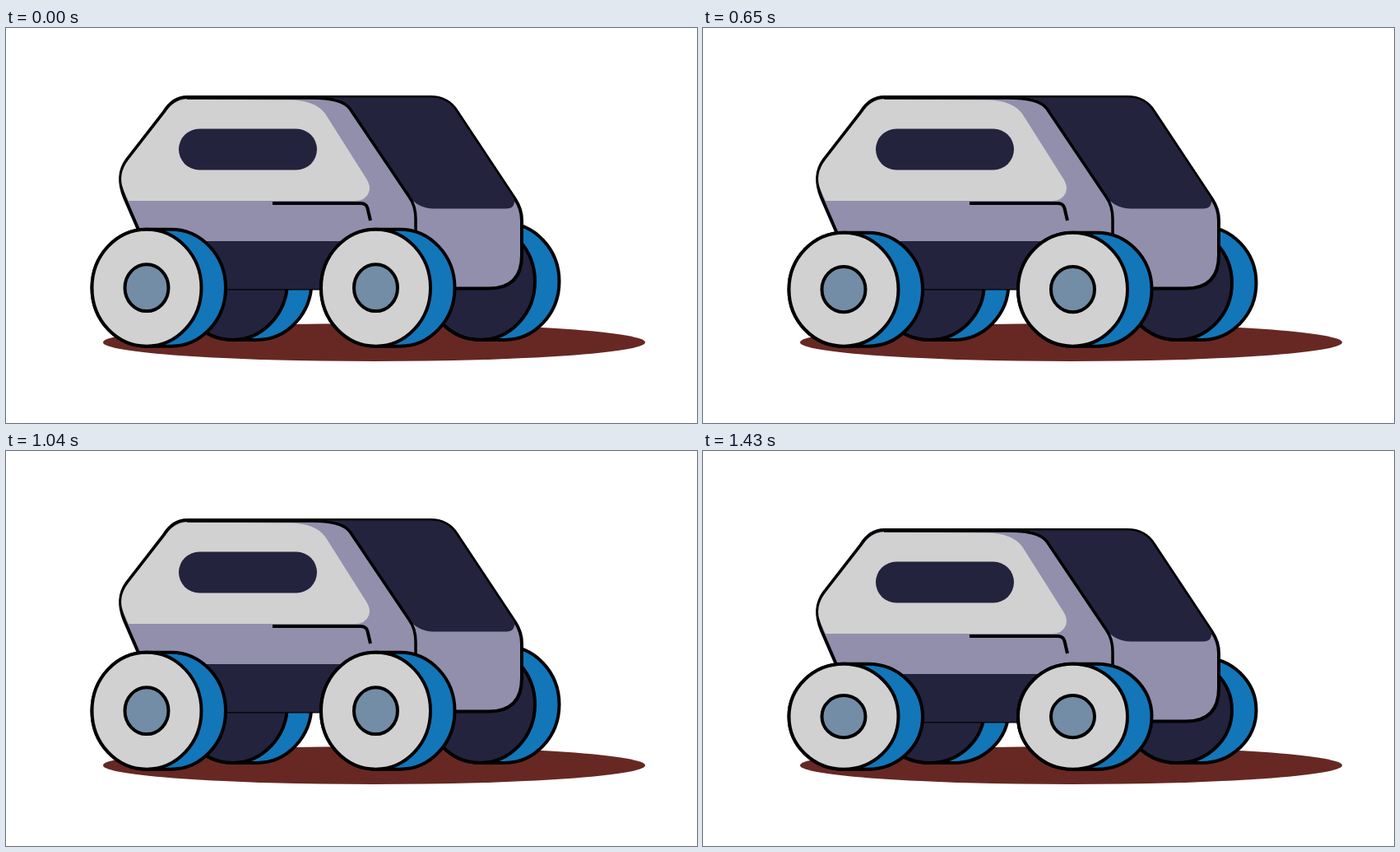
Recreate the animation shown at these times as an HTML page with a canvas. Size 840 px wide and 480 px high, loop 1560 ms.

```html
<!DOCTYPE html>
<html lang="en">
<head>
<meta charset="utf-8">
<title>Rover</title>
<style>
html, body { margin: 0; width: 100%; height: 100%; overflow: hidden; background: #fff; }
canvas { display: block; }
</style>
</head>
<body>
<canvas id="stage" width="840" height="480"></canvas>
<script>
const ctx = document.getElementById("stage").getContext("2d");
const GREY = "#d1d1d1", LILAC = "#918fac", NAVY = "#23233d", BLUE = "#1376b9",
      STEEL = "#738da6", SOIL = "#672823";

// One pose per step: how far the body sinks and how much the wheels are squashed
const STEP = 130;
const sink   = [0, 0, 0, 0, 0, 0, 4, 12, 0, 4, 8, 12];
const squash = [0, 4, 0, 4, 0, 4, 4, 14, 0, 4, 8, 14];

const hull = new Path2D("M220 84H516Q537 84 548 101L619 208Q627 220 627 234V276Q627 316.5 587 316.5H192L144 206Q133 179 147 160L192 102Q203 84 220 84Z");
const strip = new Path2D("M166 259H500V317.3H192Z");
const panel = new Path2D("M149 210L143 197Q135 178 149 160L195 101Q205 86.5 222 86.5L346 87.5Q376 88 388 104L438 183Q444 192 441 200Q437 210 424 210Z");
const glass = new Path2D("M388 84.5H516Q537 84.5 547 101L618 208Q619 219.5 608 219.5H520Q501 219 490 205L418 98Q408 86 388 84.5Z");
const seam = new Path2D("M220 85H372Q408 85 418 98L490 205Q498 216 498 232V260");
const handle = new Path2D("M324 213H431Q438 213 439.5 219L443 234");
const pill = new Path2D();
pill.roundRect(210, 122.5, 168, 50, 25);

function fill(path, color) {
  ctx.fillStyle = color;
  ctx.fill(path);
}

function oval(x, y, rx, ry, color, outlined = true) {
  const path = new Path2D();
  path.ellipse(x, y, rx, ry, 0, 0, Math.PI * 2);
  fill(path, color);
  if (outlined) ctx.stroke(path);
}

function wheel(x, ground, drop, face, hub) {
  const rx = 66.5, ry = 71 - drop / 2, y = ground - ry, depth = 29.5;
  const tire = new Path2D();
  tire.ellipse(x + depth, y, rx, ry, 0, -Math.PI / 2, Math.PI / 2);
  tire.ellipse(x, y, rx, ry, 0, Math.PI / 2, Math.PI * 1.5);
  tire.closePath();
  fill(tire, BLUE);
  ctx.stroke(tire);
  oval(x, y, rx, ry, face);
  if (hub) oval(x, y, 26.5, ry * 0.4, hub);
}

function body(dy) {
  ctx.save();
  ctx.translate(0, dy);
  fill(hull, LILAC);
  ctx.stroke(hull);
  fill(strip, NAVY);
  fill(panel, GREY);
  fill(glass, NAVY);
  fill(pill, NAVY);
  ctx.stroke(handle);
  ctx.lineWidth = 3.5;
  ctx.stroke(seam);
  ctx.restore();
}

function draw(now) {
  const i = Math.floor(now / STEP) % sink.length;
  const drop = squash[i];
  ctx.fillStyle = "#fff";
  ctx.fillRect(0, 0, 840, 480);
  ctx.strokeStyle = "#000";
  ctx.lineWidth = 4;
  oval(447.5, 382, 329.5, 23, SOIL, false);
  for (const x of [275.5, 576.5]) wheel(x, 379, drop, NAVY);
  body(sink[i]);
  for (const x of [171, 449.5]) wheel(x, 386.7, drop, GREY, STEEL);
}

const start = performance.now();
function tick() {
  draw(performance.now() - start);
  requestAnimationFrame(tick);
}
tick();
</script>
</body>
</html>
```
